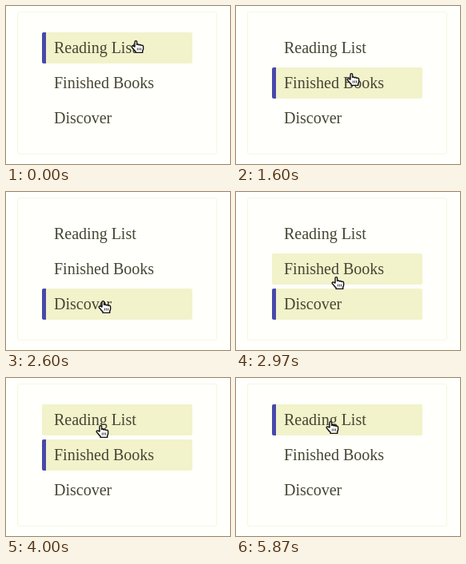
Write an HTML page that moves like this. It is 280 px wide and 198 px high and loops after 5910 ms.

```html
<!DOCTYPE html>
<html lang="en">
<head>
<meta charset="utf-8">
<title>Navigation</title>
<style>
  html, body { margin: 0; width: 280px; height: 198px; overflow: hidden; background: #fffffb; }
  body { position: relative; }
  nav {
    position: absolute; left: 14px; top: 7px; width: 250px; height: 179px;
    box-sizing: border-box; padding: 25px 30px; border: 1px solid #f6f6e2; border-radius: 3px;
  }
  nav div {
    box-sizing: border-box; width: 188px; height: 39px; margin-bottom: 5px;
    padding: 8px 10px; border-left: 5px solid transparent; border-radius: 2px;
    font: 20px/23px "Liberation Serif", "Times New Roman", serif;
    color: #464634; white-space: nowrap;
  }
  nav .hover, nav .active { background: #f2f2cb; }
  nav .active { border-left-color: #4848ac; }
  #hand { position: absolute; left: 0; top: 0; width: 18px; height: 18px; }
</style>
</head>
<body>
<nav>
  <div>Reading List</div>
  <div>Finished Books</div>
  <div>Discover</div>
</nav>
<svg id="hand" viewBox="0 0 18 18">
  <path d="M5 9V3Q5 1.6 6.3 1.6T7.6 3V6.4Q8 5.8 8.9 6T10.2 7Q10.6 6.3 11.6 6.5T12.9 7.6Q13.4 7 14.4 7.2T15.6 8.6V11.6Q15.5 13 14.7 14V16.4H6V14.8Q4.4 13.7 3.3 12L1.5 10Q.7 8.8 1.7 8.2T3.8 8.5Z"
    fill="#fff" stroke="#111" stroke-width="1.4" stroke-linejoin="round"/>
  <path d="M8.3 10.5V13.5M10.4 10.5V13.5M12.5 10.5V13.5" stroke="#222" stroke-width=".9"/>
</svg>
<script>
  const LOOP = 5910;
  const items = [...document.querySelectorAll("nav div")];
  const hand = document.getElementById("hand");

  // Pointer tip: [start, end, x, y]
  const start = [163, 43];
  const moves = [
    [60, 520, 145, 84],
    [1800, 2090, 122, 137],
    [2560, 2900, 126, 106],
    [3630, 3950, 119, 59],
    [4850, 5150, 119, 54]
  ];
  // Clicks: [time, item]
  const clicks = [[0, 0], [1200, 1], [2400, 2], [3250, 1], [4400, 0]];

  const ease = p => p * p * (3 - 2 * p);

  function pointer(t) {
    let [x, y] = start;
    for (const [from, to, nx, ny] of moves) {
      if (t < from) break;
      const p = ease(Math.min(1, (t - from) / (to - from)));
      x += (nx - x) * p;
      y += (ny - y) * p;
    }
    return [Math.round(x), Math.round(y)];
  }

  function draw(now) {
    const t = now % LOOP;
    const [x, y] = pointer(t);
    const active = clicks.filter(c => c[0] <= t).pop()[1];
    items.forEach((item, i) => {
      const top = 33 + 44 * i;
      item.classList.toggle("active", i === active);
      item.classList.toggle("hover", y >= top && y < top + 39);
    });
    hand.style.transform = `translate(${x - 7}px, ${y - 1}px)`;
  }

  const begin = performance.now();
  function frame() {
    draw(performance.now() - begin);
    requestAnimationFrame(frame);
  }
  frame();
</script>
</body>
</html>
```
